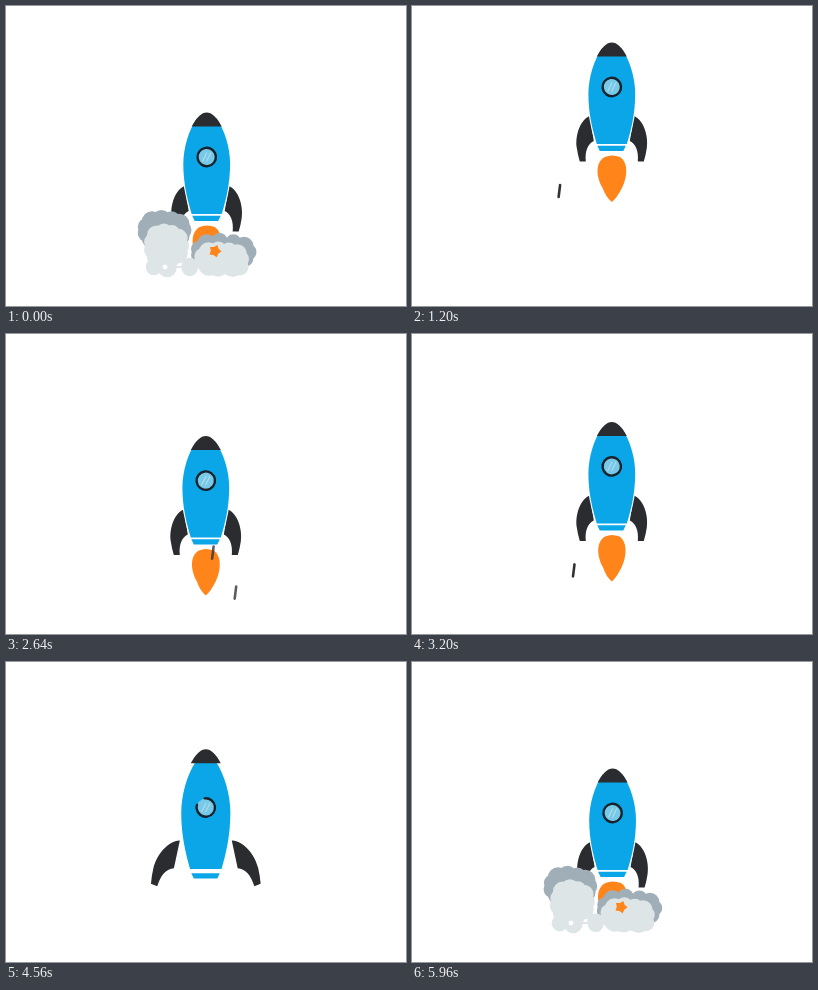
Write an HTML page with a canvas that moves like this. It is 400 px wide and 300 px high and loops after 6000 ms.

```html
<!DOCTYPE html>
<html lang="en">
<head>
<meta charset="utf-8">
<title>Rocket</title>
<style>
  html, body { margin: 0; width: 100%; height: 100%; overflow: hidden; background: #fff; }
  canvas { display: block; width: 400px; height: 300px; }
</style>
</head>
<body>
<canvas width="400" height="300"></canvas>
<script>
const ctx = document.querySelector('canvas').getContext('2d');
const LOOP = 6000, STEP = 40, TAU = 2 * Math.PI;
const DARK = '#2b2c2f', BLUE = '#0ba6e8', ORANGE = '#ff851b', GREY = '#a0aeb7', PALE = '#dde5e6';

// Rocket parts: x is measured from the rocket's axis, y from the resting stage position.
const nose = new Path2D('M-15 120.5C-10 111 -5 106.5 0 106.5C5 106.5 10 111 15 120.5Z');
const body = new Path2D('M-9.5 112H9.5C18 124 23.4 142 23.4 158C23.4 178 19 195 15 208H-15C-19 195-23.4 178-23.4 158C-23.4 142-18 124-9.5 112Z');
const strip = new Path2D('M-14.5 209.7H14L11.5 215H-12Z');
const fin = new Path2D('M-22 180C-31 183-37 199-35 212Q-34 219-32 225.5H-26C-27 215-24 208-18 205Z');
const flame = new Path2D('M-7 221Q0 218 8 221C16 226 16 240 10 252Q5 262 0 266Q-6 261-9 252C-16 240-16 226-7 221Z');

const clamp = v => Math.max(0, Math.min(1, v));
const ramp = (t, from, to) => clamp((t - from) / (to - from));
const ease = (t, from, to) => { const p = ramp(t, from, to); return p * p * (3 - 2 * p); };

function fill(path, color) {
  ctx.fillStyle = color;
  ctx.fill(path);
}

function place(x, y, sx, sy, angle, draw) {
  ctx.save();
  ctx.translate(x, y);
  ctx.rotate(angle);
  ctx.scale(sx, sy);
  ctx.translate(-x, -y);
  draw();
  ctx.restore();
}

function shift(dx, dy, draw) {
  ctx.save();
  ctx.translate(dx, dy);
  draw();
  ctx.restore();
}

function height(t) {
  if (t < 600) return -268 * (t / 480) ** 2;
  if (t < 4200) {
    const drop = 72 * Math.exp((1200 - t) / 240);
    const lift = 27 * ramp(t, 2160, 3400) ** 1.55;
    const leave = 106 * (Math.max(0, t - 3400) / 320) ** 1.2;
    return 2 - drop - lift - leave;
  }
  return 0;
}

function drawWindow(progress) {
  ctx.fillStyle = '#78c9e8';
  ctx.beginPath();
  ctx.arc(0, 151, 9, 0, TAU);
  ctx.fill();
  ctx.strokeStyle = '#a9dcee';
  ctx.lineWidth = 1.2;
  ctx.beginPath();
  for (const x of [-4, 0]) {
    ctx.moveTo(x, 155);
    ctx.lineTo(x + 4, 147);
  }
  ctx.stroke();
  ctx.strokeStyle = '#18222a';
  ctx.lineWidth = 2.4;
  ctx.beginPath();
  ctx.arc(0, 151, 9.2, -1.7, -1.7 + TAU * progress);
  ctx.stroke();
}

function drawRocket(t) {
  const building = t > 4200;
  const apart = building ? 1 - ease(t, 4590, 4790) : 0;
  const grow = (from, to) => building ? ease(t, from, to) : 1;
  const bodySize = grow(4250, 4440), noseSize = grow(4330, 4500);
  const finSize = grow(4350, 4520) * (1 + 0.12 * apart);
  const fireSize = grow(4760, 4900);
  const fireWidth = 1 + 0.04 * Math.sin(t / 47);

  if (fireSize) place(0, 220, fireSize * fireWidth, fireSize, 0, () => fill(flame, ORANGE));
  for (const side of [-1, 1]) {
    ctx.save();
    ctx.scale(-side, 1);
    shift(-4 * apart, -2 * apart, () =>
      place(-23, 180, finSize, finSize, 0.37 * apart, () => fill(fin, DARK)));
    ctx.restore();
  }
  shift(0, -apart, () =>
    place(0, 207, bodySize * (1 + 0.05 * apart), bodySize * (1 + 0.12 * apart), 0, () => {
      ctx.strokeStyle = '#fff';
      ctx.lineWidth = 2.5;
      ctx.stroke(body);
      fill(body, BLUE);
    }));
  shift(0, 1.5 * apart, () => place(0, 212, bodySize, bodySize, 0, () => fill(strip, BLUE)));
  shift(0, -5.5 * apart, () =>
    place(0, 151, bodySize, bodySize, 0, () => drawWindow(grow(4400, 4620))));
  shift(0, -19.3 * apart, () => place(0, 121, noseSize, noseSize, 0, () => fill(nose, DARK)));
}

// Speed lines appear at a steady rate, spread across the rocket's wake.
function drawStreaks(t) {
  ctx.lineCap = 'round';
  ctx.lineWidth = 2.6;
  ctx.strokeStyle = '#333';
  for (let i = 0; i < 14; i++) {
    const age = t - 1000 - 200 * i;
    if (age <= 0 || age >= 400) continue;
    const x = 126 + 120 * ((0.18 + 0.812 * i) % 1);
    const y = 215 + height(t) + 0.2 * age;
    ctx.globalAlpha = Math.min(1, age / 50, (400 - age) / 200);
    ctx.beginPath();
    ctx.moveTo(x + 0.5, y - 6);
    ctx.lineTo(x - 1, y + 6);
    ctx.stroke();
  }
  ctx.globalAlpha = 1;
}

const smokeSize = (t, delay) => t < 600
  ? 1 - ease(t, 60 + delay, 360 + delay)
  : ease(t, 4830 + 4 * delay, 5250 + 4 * delay);

// A cloud is an ellipse with round bumps along its edge.
function drawCloud(t, cx, cy, rx, ry, bump, color) {
  const count = 11;
  ctx.fillStyle = color;
  ctx.beginPath();
  for (let i = 0; i < count; i++) {
    const size = smokeSize(t, i * 10);
    if (!size) continue;
    const angle = i * TAU / count, churn = t / LOOP * 6 * TAU + i * 2;
    const x = cx + rx * Math.cos(angle) * size;
    const y = cy + ry * Math.sin(angle) * size + 20 * (1 - size);
    const r = (bump + Math.sin(churn)) * size;
    ctx.moveTo(x + r, y);
    ctx.arc(x, y, r, 0, TAU);
  }
  const core = smokeSize(t, 50);
  ctx.moveTo(cx + rx * core, cy);
  ctx.ellipse(cx, cy, rx * core, ry * core, 0, 0, TAU);
  ctx.fill();
}

function drawSpark(x, y, r, color) {
  ctx.fillStyle = color;
  ctx.beginPath();
  for (let i = 0; i < 10; i++) {
    const a = i * TAU / 10 - 1.2, d = i % 2 ? r * 0.65 : r;
    ctx.lineTo(x + d * Math.cos(a), y + d * Math.sin(a));
  }
  ctx.fill();
}

function drawSmoke(t) {
  drawCloud(t, 158, 224, 18, 11, 9.5, GREY);
  drawCloud(t, 217, 246, 25, 11, 8.5, GREY);
  drawCloud(t, 160, 240, 14, 14, 9, PALE);
  drawCloud(t, 215, 253, 19, 9, 9, PALE);
  drawCloud(t, 190, 261, 44, 1, 8.5, PALE);
  drawSpark(209, 245, 6.5 * smokeSize(t, 50), ORANGE);
  drawSpark(159, 261, 3 * smokeSize(t, 60), '#fff');
}

function render(t) {
  ctx.fillStyle = '#fff';
  ctx.fillRect(0, 0, 400, 300);
  const smoky = t < 600 || t > 4800;
  const shake = t > 4900 ? 0.3 * Math.sin(t / 25) : 0;
  const axis = t < 600 ? 200.7 : 199.8 + 0.9 * ease(t, 4600, 4900) + shake;
  shift(axis, height(t), () => drawRocket(t));
  drawStreaks(t);
  if (smoky) drawSmoke(t);
}

function tick() {
  render(Math.floor(performance.now() % LOOP / STEP) * STEP);
  requestAnimationFrame(tick);
}
tick();
</script>
</body>
</html>
```
